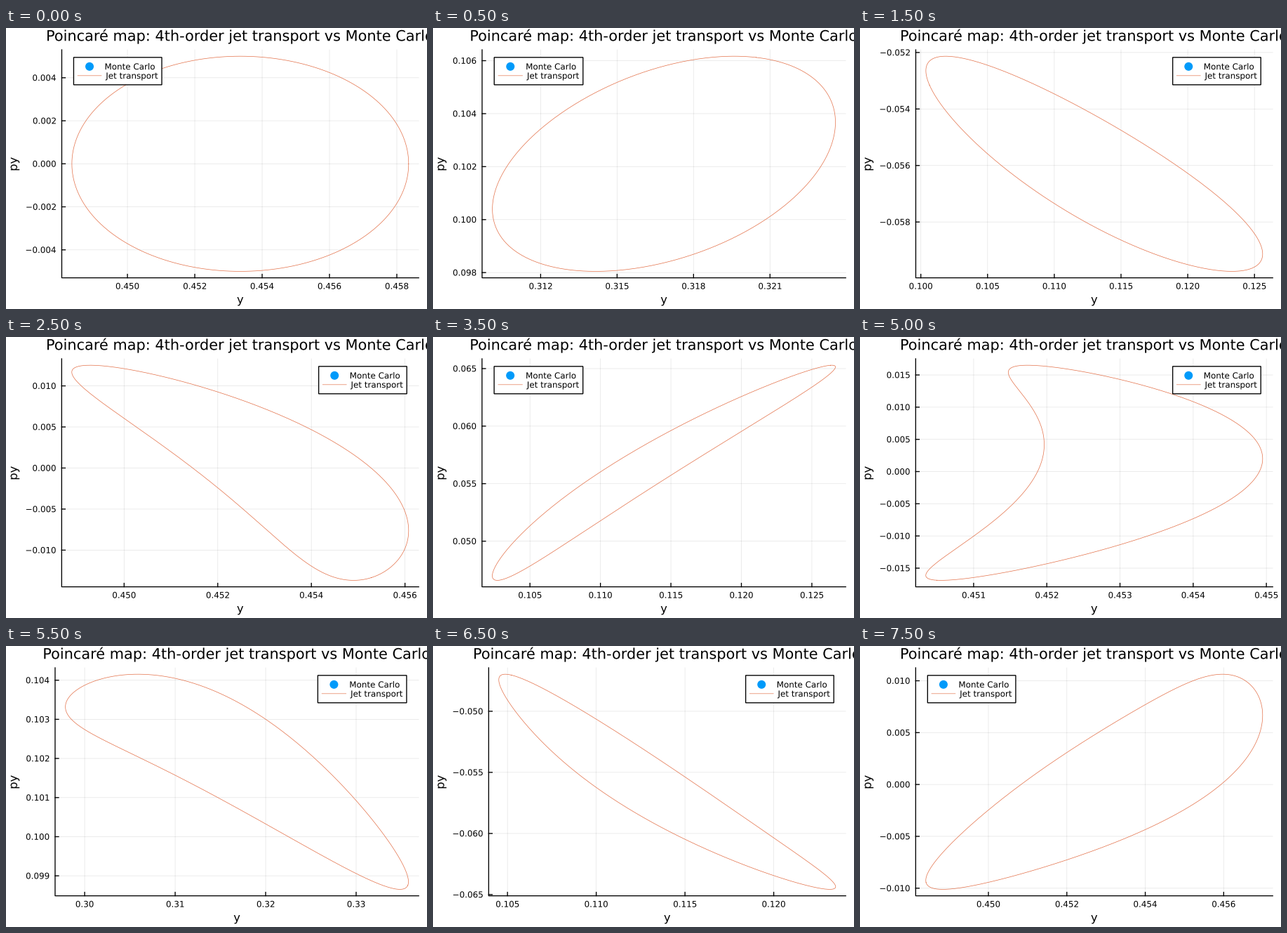
Write a matplotlib script that moves like this. It is 600x400 px and loops after 8000 ms.

```python
import numpy as np
import matplotlib.pyplot as plt
from matplotlib.animation import FuncAnimation
from matplotlib.patches import Circle, PathPatch, Rectangle
from matplotlib.textpath import TextPath
from matplotlib.transforms import Affine2D

W, H, DPI = 600, 400, 100
FRAMES, INTERVAL = 16, 500
TOP, BOTTOM, RIGHT = 31.0, 355.6, 588.2
TICK_PX, LABEL_PX, TITLE_PX = 11.92, 16.39, 20.86
BLUE, ORANGE = "#009afa", "#e36f47"
TITLE = "Poincaré map: 4th-order jet transport vs Monte Carlo"

# Hénon-Heiles energy, initial point and neighbourhood radius
E0, Y0, RADIUS, ORDER = 0.1025, 0.45335, 0.005, 4
FIT_ORDER = 7
EXPS = [(i, n - i) for n in range(FIT_ORDER + 1) for i in range(n + 1)]
LOW = [k for k, e in enumerate(EXPS) if sum(e) <= ORDER]


def flow(s):
    x, y, px, py = s
    return np.array([px, py, -x - 2 * x * y, -y - x * x + y * y])


def flow_along_x(s):
    return flow(s) / s[2]


def rk4(f, s, h):
    a = f(s)
    b = f(s + h / 2 * a)
    c = f(s + h / 2 * b)
    d = f(s + h * c)
    return s + h / 6 * (a + 2 * b + 2 * c + d)


def section_hits(y, py, dt=0.02):
    """Successive crossings of x = 0 with px > 0, as (crossing, (y, py), point)."""
    px = np.sqrt(2 * E0 - py**2 - y**2 + 2 * y**3 / 3)
    s = np.array([np.zeros_like(y), y, px, py])
    hits = np.zeros((FRAMES + 3, 2, y.size))
    hits[0] = y, py
    count = np.zeros(y.size, int)
    while count.min() < FRAMES - 1:
        new = rk4(flow, s, dt)
        up = (s[0] < 0) & (new[0] >= 0)
        if up.any():
            cross = rk4(flow_along_x, new[:, up], -new[0, up])
            count[up] += 1
            hits[count[up], :, up] = cross[[1, 3]].T
        s = new
    return hits[:FRAMES]


def monomials(u, v):
    return np.stack([u**i * v**j for i, j in EXPS], axis=1)


def jet_curves():
    """Image of the circle under the truncated Taylor expansion of each map."""
    g = np.linspace(-1, 1, 17)
    u, v = (m.ravel() for m in np.meshgrid(g, g))
    inside = u**2 + v**2 <= 1.001
    u, v = u[inside], v[inside]
    hits = section_hits(Y0 + RADIUS / 2 * u, RADIUS / 2 * v)
    basis = monomials(u, v)
    th = np.linspace(0, 2 * np.pi, 401)
    circle = monomials(2 * np.cos(th), 2 * np.sin(th))[:, LOW]
    curves = []
    for hit in hits:
        coef = np.linalg.lstsq(basis, hit.T, rcond=None)[0]
        curves.append((circle @ coef[LOW]).T)
    return curves


def widen(v):
    pad = 0.03 * np.ptp(v)
    return v.min() - pad, v.max() + pad


def nice_ticks(lo, hi):
    span = hi - lo
    z = np.floor(np.log10(span))
    best, ticks = -1, []
    for e in (z - 1, z):
        for q, nice in ((1, 1), (5, 0.9), (2, 0.7), (2.5, 0.5), (3, 0.2)):
            step = q * 10.0**e
            k = np.arange(np.ceil(lo / step), np.floor(hi / step) + 1)
            n = len(k)
            if not 4 <= n <= 8:
                continue
            score = (1 - abs(n - 5) / 5 + nice) / 4 + span / (2 * (n - 1) * step)
            if score > best:
                best, ticks = score, k * step + 0.0
    d = next((d for d in range(1, 8) if np.allclose(ticks, np.round(ticks, d), 0, 1e-9)), 8)
    return ticks, [f"{t:.{d}f}".replace("-", "\u2212") for t in ticks]


def ink_width(s, px):
    return TextPath((0, 0), s, size=px).get_extents().width


def text(x, y, s, px, align=0.5, angle=0):
    path = TextPath((0, 0), s, size=px)
    box = path.get_extents()
    place = Affine2D().translate(-box.x0 - align * box.width, 0).scale(1, -1)
    place = place.rotate_deg(-angle).translate(x, y)
    ax.add_patch(PathPatch(path.transformed(place), fc="black", lw=0, zorder=5))


def line(x, y, color="black", px=1.35, **kw):
    ax.plot(x, y, color=color, lw=px * 72 / DPI, **kw)


def legend(left, on_left):
    f = (RIGHT - left) / 45
    dx, y = (RIGHT - left) / 30, TOP + (BOTTOM - TOP) / 30
    names = "Monte Carlo", "Jet transport"
    width = 4.5 * f + max(ink_width(n, TICK_PX) for n in names)
    x = left + dx if on_left else RIGHT - dx - width
    row = 13
    ax.add_patch(Rectangle((x, y), width, 3 * row, fc="white", ec="black",
                           lw=1.35 * 72 / DPI, zorder=4))
    ax.add_patch(Circle((x + 2 * f, y + row), 6, fc=BLUE, lw=0, zorder=5))
    line([x + f / 2, x + 3.5 * f], [y + 2 * row] * 2, ORANGE, 0.65, zorder=5)
    for i, name in enumerate(names, 1):
        text(x + 4 * f, y + i * row + 4.3, name, TICK_PX, align=0)


def draw(i):
    ax.clear()
    ax.set(xlim=(0, W), ylim=(H, 0))
    ax.axis("off")

    y, py = CURVES[i]
    (x0, x1), (y0, y1) = widen(y), widen(py)
    xticks, xnames = nice_ticks(x0, x1)
    yticks, ynames = nice_ticks(y0, y1)
    left = 37.3 + max(ink_width(n, TICK_PX) for n in ynames)
    mid = (left + RIGHT) / 2
    u, v = (y - x0) / (x1 - x0), (py - y0) / (y1 - y0)

    def to_x(t):
        return left + t * (RIGHT - left)

    def to_y(t):
        return BOTTOM - t * (BOTTOM - TOP)

    grid = dict(color="black", px=0.75, alpha=0.1, zorder=1)
    for t, name in zip(to_x((xticks - x0) / (x1 - x0)), xnames):
        line([t, t], [TOP, BOTTOM], **grid)
        line([t, t], [BOTTOM, BOTTOM - 5], zorder=2)
        text(t, 371.6, name, TICK_PX)
    for t, name in zip(to_y((yticks - y0) / (y1 - y0)), ynames):
        line([left, RIGHT], [t, t], **grid)
        line([left, left + 5], [t, t], zorder=2)
        text(left - 8.6, t + 4.3, name, TICK_PX, align=1)
    line([left, left, RIGHT], [TOP, BOTTOM, BOTTOM], zorder=2)

    line(to_x(u), to_y(v), ORANGE, 0.7, zorder=3)

    text(mid, 18.3, TITLE, TITLE_PX)
    text(mid, 392, "y", LABEL_PX)
    text(15.8, (TOP + BOTTOM) / 2, "py", LABEL_PX, angle=90)

    def crowding(cx):
        return np.sum(1 / (1 + 100 * ((u - cx) ** 2 + (v - 1) ** 2)))

    legend(left, crowding(0) <= crowding(1) + 1e-6)
    return []


plt.rcParams["path.snap"] = False
CURVES = jet_curves()
fig = plt.figure(figsize=(W / DPI, H / DPI), dpi=DPI, facecolor="white")
ax = fig.add_axes([0, 0, 1, 1])
anim = FuncAnimation(fig, draw, frames=FRAMES, init_func=lambda: draw(0),
                     interval=INTERVAL, repeat=True, repeat_delay=0)
plt.show()
```
